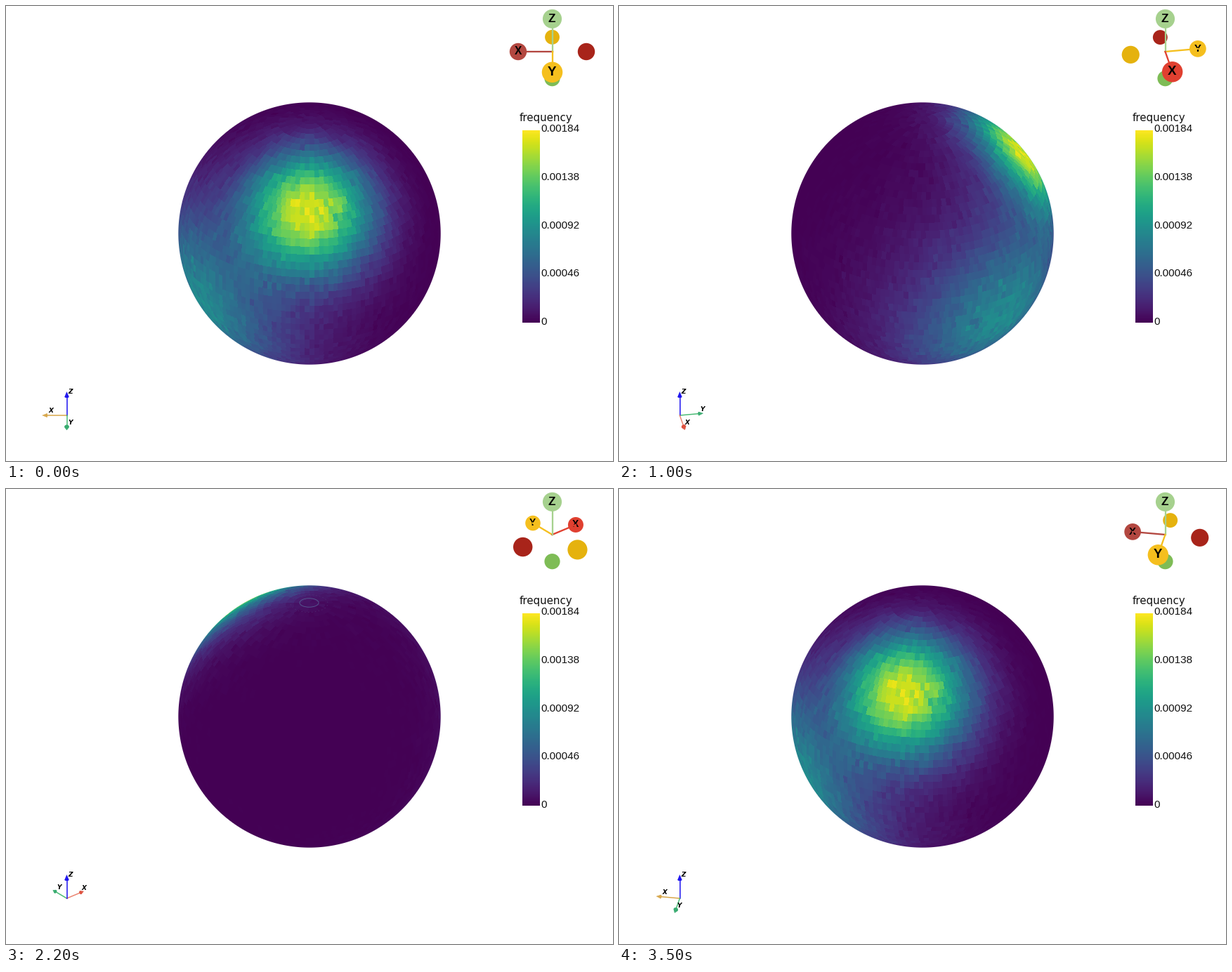
Animation of 864 by 648 pixels, one loop 3.6 s. Source, as a matplotlib script:

```python
import matplotlib.pyplot as plt
import numpy as np
from matplotlib.animation import FuncAnimation
from matplotlib.collections import PolyCollection
from matplotlib.patches import Circle, Ellipse

W, H, DPI = 864, 648, 100
FRAMES = 36
CX, CY, R = 432, 324, 186.7
TILT = np.radians(30)
CT, ST = np.cos(TILT), np.sin(TILT)
PX = 72 / DPI
VIRIDIS = plt.get_cmap("viridis")


def rgb(r, g, b):
    return r / 255, g / 255, b / 255


fig = plt.figure(figsize=(W / DPI, H / DPI), dpi=DPI, facecolor="white")
ax = fig.add_axes([0, 0, 1, 1])
ax.axis("off")


# --- density on the sphere, binned in cells of about equal area ---
BANDS = 52
polar = (np.arange(BANDS) + 0.5) * np.pi / BANDS
counts = np.maximum(6, np.round(2 * np.pi * np.sin(polar) / 0.0364)).astype(int)
starts = np.concatenate([[0], np.cumsum(counts)[:-1]])
cell_lat = np.repeat(np.pi / 2 - polar, counts)
cell_lon = np.concatenate([(np.arange(n) + 0.5) * 2 * np.pi / n for n in counts])


def lobe(lat, lon, height, kappa):
    lat, lon = np.radians([lat, lon])
    cos = (np.sin(cell_lat) * np.sin(lat)
           + np.cos(cell_lat) * np.cos(lat) * np.cos(cell_lon - lon))
    return height * np.exp(kappa * (cos - 1))


density = lobe(40, 0, 0.93, 8.5) + lobe(-18, -60, 0.48, 3.5)
noise = np.random.default_rng(4).normal(size=density.size)
density = np.clip(density + 0.036 * noise * np.sqrt(density), 0, 0.97)
cell_rgb = VIRIDIS(density)[:, :3]

# --- view rays for every pixel of the disc ---
HALF = 188
grid = np.arange(-HALF, HALF) + 0.5
right, down = np.meshgrid(grid / R, grid / R)
rad = np.hypot(right, down)
shrink = np.maximum(rad, 1)
right, up = right / shrink, -down / shrink
depth = np.sqrt(np.clip(1 - right**2 - up**2, 0, 1))
height = up * CT + depth * ST
angle = np.arctan2(right, depth * CT - up * ST)
band = np.minimum((np.arccos(np.clip(height, -1, 1)) / np.pi * BANDS).astype(int),
                  BANDS - 1)
pixels = np.ones((2 * HALF, 2 * HALF, 4))
pixels[..., 3] = np.clip((1 - rad) * R + 0.5, 0, 1)


def paint_sphere(phi):
    turn = ((angle - phi) / (2 * np.pi)) % 1
    col = np.minimum((turn * counts[band]).astype(int), counts[band] - 1)
    pixels[..., :3] = cell_rgb[starts[band] + col]
    return pixels


ball_img = ax.imshow(paint_sphere(0), interpolation="nearest", zorder=1,
                     extent=(CX - HALF, CX + HALF, CY + HALF, CY - HALF))
rings = [Ellipse((CX - 0.5, 162), 27, 12.5, fill=False, lw=0.7, ls="-",
                 ec=rgb(84, 84, 142), zorder=2),
         Ellipse((CX - 0.5, 163), 53, 25, fill=False, lw=0.5, ls=(0, (2, 5)),
                 ec=rgb(78, 50, 118), zorder=2)]
for ring in rings:
    ax.add_patch(ring)

# --- colour bar ---
ax.imshow(VIRIDIS(np.linspace(1, 0, 256))[:, None, :3], interpolation="nearest",
          extent=(735, 760, 451, 177), zorder=1)
ax.text(730.5, 164, "frequency", family="DejaVu Sans", size=15 * PX,
        color="#111111", zorder=3)
for k, label in enumerate(["0.00184", "0.00138", "0.00092", "0.00046", "0"]):
    ax.text(761.5, 179 + 68.8 * k, label, family="Liberation Sans",
            size=15.3 * PX, color="#111111", zorder=3)

ax.set_aspect("auto")
ax.set_xlim(0, W)
ax.set_ylim(H, 0)


def project(points, phi, origin, size):
    """Perspective view of X, Y, Z points: pixel positions, depth and scale."""
    x, y, z = np.moveaxis(np.asarray(points, float), -1, 0)
    across = y * np.sin(phi) - x * np.cos(phi)
    toward = y * np.cos(phi) + x * np.sin(phi)
    near = toward * CT + z * ST
    scale = 1 / (1 - 0.2 * near)
    px = origin[0] + size * scale * across
    py = origin[1] - size * scale * (z * CT - toward * ST)
    return np.stack([px, py], -1), near, scale


AXES = np.eye(3)
PLUS = [rgb(224, 64, 48), rgb(245, 191, 30), rgb(166, 209, 142)]
MINUS = [rgb(168, 36, 26), rgb(229, 178, 14), rgb(126, 188, 86)]
DULL_RED = rgb(179, 71, 64)


class Handle:
    """One ball of the corner gizmo, with a shaft and a letter if positive."""
    ORIGIN, SIZE = (777.5, 65), 48.5

    def __init__(self, k, sign):
        self.k, self.vec, self.plus = k, AXES[k] * sign, sign > 0
        color = (PLUS if self.plus else MINUS)[k]
        self.ball = ax.add_patch(Circle((0, 0), 12, fc=color, lw=0))
        if self.plus:
            self.shaft, = ax.plot([], [], color=color, lw=2.3 * PX)
            self.text = ax.text(0, 0, "XYZ"[k], family="Liberation Sans",
                                weight="bold", ha="center", color="black")

    def update(self, phi, dull):
        (x, y), near, scale = project(self.vec, phi, self.ORIGIN, self.SIZE)
        self.ball.set_center((x, y))
        self.ball.set_radius(12.2 * scale)
        self.ball.set_zorder(5 + near)
        if not self.plus:
            return
        color = DULL_RED if dull and self.k == 0 else PLUS[self.k]
        self.ball.set_facecolor(color)
        self.shaft.set_color(color)
        self.shaft.set_data([self.ORIGIN[0], x], [self.ORIGIN[1], y])
        self.shaft.set_zorder(5 + near / 2)
        size = 15.5 * scale
        self.text.set_fontsize(size * PX)
        self.text.set_position((x - 0.3, y - 1.5 * scale + 0.345 * size))
        self.text.set_zorder(5.01 + near)


class Arrow:
    """One arrow of the small axes marker."""
    ORIGIN, SIZE = (86.5, 583), 35
    SHAFT = [rgb(235, 132, 112), rgb(72, 186, 116), rgb(25, 15, 240)]
    CONE = [rgb(222, 82, 64), rgb(56, 172, 112), rgb(25, 15, 240)]
    TAN = rgb(216, 166, 72)

    def __init__(self, k):
        self.k, self.tip = k, AXES[k]
        a = np.linspace(0, 2 * np.pi, 17)[:, None]
        u, v = AXES[(k + 1) % 3], AXES[(k + 2) % 3]
        self.base = 0.8 * self.tip + 0.08 * (np.cos(a) * u + np.sin(a) * v)
        self.shaft, = ax.plot([], [], lw=1.5 * PX)
        self.cone = ax.add_collection(PolyCollection([], lw=0), autolim=False)
        self.text = ax.text(0, 0, "XYZ"[k], family="DejaVu Sans", weight="bold",
                            style="italic", size=9 * PX, ha="center",
                            color="black", zorder=8)

    def update(self, phi, dull):
        tip, near, _ = project(self.tip, phi, self.ORIGIN, self.SIZE)
        base = project(self.base, phi, self.ORIGIN, self.SIZE)[0]
        sides = [np.array([tip, p, q]) for p, q in zip(base[:-1], base[1:])]
        tan = dull and self.k == 0
        self.cone.set_verts(sides + [base])
        self.cone.set_facecolor(self.TAN if tan else self.CONE[self.k])
        self.cone.set_zorder(5.5 + near)
        end = project(0.82 * self.tip, phi, self.ORIGIN, self.SIZE)[0]
        self.shaft.set_data([self.ORIGIN[0], end[0]], [self.ORIGIN[1], end[1]])
        self.shaft.set_color(self.TAN if tan else self.SHAFT[self.k])
        self.shaft.set_zorder(5 + near / 2)
        x, y = np.array(self.ORIGIN) + 0.8 * (tip - self.ORIGIN)
        self.text.set_position((x + 5, y - 7 + 3.3))


parts = [Handle(k, s) for k in range(3) for s in (1, -1)]
parts += [Arrow(k) for k in range(3)]


def draw(i):
    phi = 2 * np.pi * i / FRAMES
    dull = i <= 8 or i >= 32
    ball_img.set_data(paint_sphere(phi))
    for ring in rings:
        ring.set_visible(12 <= i <= 25)
    for part in parts:
        part.update(phi, dull)
    return []


anim = FuncAnimation(fig, draw, frames=FRAMES, interval=100, repeat=True,
                     repeat_delay=0, blit=False)
plt.show()
```
